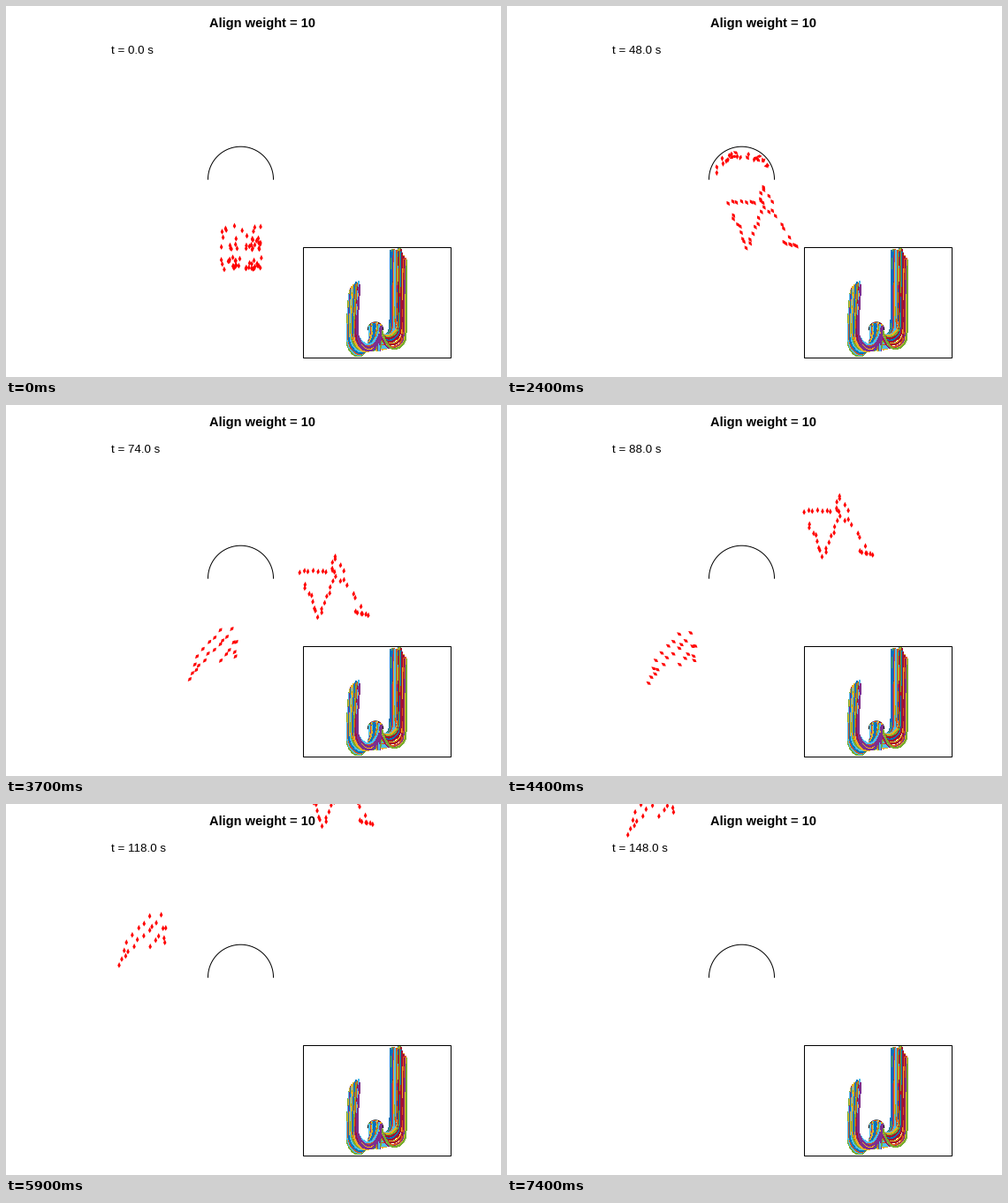
These frames come from a looping animation (560x420 px, 7.5 s). A matplotlib script:

```python
import numpy as np
import matplotlib.pyplot as plt
from matplotlib.animation import FuncAnimation
from matplotlib.collections import LineCollection, PolyCollection
from matplotlib.patches import Rectangle

W, H, DPI = 560, 420, 100
FRAMES, STEP = 75, 2.0            # simulated seconds per frame
CX, CY, R = 265.5, 196.2, 37.0    # shelter arc
SPEED = 4.8
PX = 72 / DPI                     # one pixel in points
rng = np.random.default_rng(4)

# Flock shapes as strokes: (agents, corner points)
RIGHT = [(8, [(334, 42), (371, 40)]),
         (8, [(340, 54), (349, 70), (356, 92)]),
         (7, [(359, 87), (374, 53)]),
         (7, [(377, 22), (370, 36), (380, 52)]),
         (7, [(382, 32), (386, 48), (404, 80)]),
         (6, [(400, 86), (414, 90)])]
LEFT = [(8, [(129, 251), (138, 221), (161, 194)]),
        (9, [(134, 238), (176, 195)]),
        (7, [(162, 230), (180, 206), (180, 226)])]

# Group courses: time, offset x, offset y, heading in degrees
RIGHT_KEYS = [(48, -86, 181, -56), (74, -4, 147, 83), (104, 0, 0, 89), (152, 3, -235, 89)]
LEFT_KEYS = [(74, 80, 60, 230), (104, 0, 0, 92), (152, 10, -235, 87)]


def hermite(t, t0, p0, v0, t1, p1, v1):
    d = t1 - t0
    u = (t - t0) / d
    return ((2 * u**3 - 3 * u**2 + 1) * p0 + (u**3 - 2 * u**2 + u) * d * v0
            + (3 * u**2 - 2 * u**3) * p1 + (u**3 - u**2) * d * v1)


def velocity(deg):
    a = np.radians(deg)
    return SPEED * np.array([np.cos(a), -np.sin(a)])


def course(t, keys):
    i = max(0, min(sum(k[0] <= t for k in keys) - 1, len(keys) - 2))
    (t0, x0, y0, h0), (t1, x1, y1, h1) = keys[i:i + 2]
    return hermite(t, t0, np.array([x0, y0]), velocity(h0),
                   t1, np.array([x1, y1]), velocity(h1))


def formation(strokes):
    parts = []
    for count, corners in strokes:
        c = np.array(corners, float)
        along = np.concatenate([[0], np.cumsum(np.hypot(*np.diff(c, axis=0).T))])
        s = np.linspace(0, along[-1], count)
        parts.append(np.column_stack([np.interp(s, along, c[:, k]) for k in (0, 1)]))
    pts = np.vstack(parts)
    pts += rng.uniform(-2, 2, pts.shape)
    return pts[np.argsort(pts[:, 0])]


def start_block(n):
    row = rng.choice([255, 268, 291], n, p=[0.17, 0.36, 0.47])
    return np.column_stack([rng.uniform(241, 289, n), row + rng.uniform(-7, 7, n)])


class Group:
    def __init__(self, strokes, keys):
        self.shape, self.keys = formation(strokes), keys
        n = len(self.shape)
        start = start_block(n)
        self.start = start[np.argsort(start[:, 0])]
        self.phase = rng.uniform(0, 2 * np.pi, n)
        self.rate = rng.uniform(0.35, 0.7, n)
        dx = (self.start[:, 0] - CX) * 1.28
        self.cap = CY - np.sqrt(R**2 - dx**2) + rng.uniform(4, 12, n)
        self.join, x, y, heading = keys[0]
        self.goal, self.v1 = self.shape + (x, y), velocity(heading)
        dist = np.hypot(*(self.goal - self.rise(60)).T)
        self.leave = np.clip(self.join - dist / SPEED, 23, self.join - 5)
        self.home = self.rise(self.leave)

    def rise(self, t):
        grow = 1 + 0.28 * np.clip(t / 22, 0, 1)
        x = CX + (self.start[:, 0] - CX) * grow
        return np.column_stack([x, np.maximum(self.start[:, 1] - SPEED * t, self.cap)])

    def dwell(self, t):
        amp = 1.5 * np.clip((t - 10) / 12, 0, 1) * np.clip((self.leave - t) / 4, 0, 1)
        a = self.phase + self.rate * t
        return self.rise(t) + np.column_stack([amp * np.cos(a), amp * np.sin(a)])

    def at(self, t):
        if t >= self.join:
            return self.shape + course(t, self.keys)
        out = hermite(t, self.leave[:, None], self.home, velocity(-90),
                      self.join, self.goal, self.v1)
        return np.where((t < self.leave)[:, None], self.dwell(t), out)


groups = [Group(RIGHT, RIGHT_KEYS), Group(LEFT, LEFT_KEYS)]


def positions(t):
    return np.vstack([g.at(t) for g in groups]) + 0.5


def kites(t):
    p = positions(t)
    d = positions(t + 0.2) - positions(t - 0.2)
    d /= np.maximum(np.hypot(*d.T), 1e-9)[:, None]
    side = 1.8 * np.column_stack([-d[:, 1], d[:, 0]])
    return np.stack([p + 3.3 * d, p + side - 0.4 * d,
                     p - 3.3 * d, p - side - 0.4 * d], axis=1)


fig = plt.figure(figsize=(W / DPI, H / DPI), dpi=DPI, facecolor="white")
ax = fig.add_axes([0, 0, 1, 1])
ax.set(xlim=(0, W), ylim=(H, 0))
ax.axis("off")


def shelter(x, y, r, z):
    a = np.linspace(0, np.pi, 90)
    ax.plot(x + r * np.cos(a), y - r * np.sin(a), color="black", lw=PX, zorder=z)


shelter(CX, CY, R, 2)
ax.text(289.5, 24, "Align weight = 10", ha="center", va="baseline",
        family="Liberation Sans", weight="bold", size=14.67 * PX)
clock = ax.text(118.6, 54, "", ha="left", va="baseline",
                family="Liberation Sans", size=13.33 * PX)
agents = PolyCollection(kites(0), facecolor="red", edgecolor="none", zorder=3)
ax.add_collection(agents)

# Inset: every track of the whole run at a smaller scale
IX, IY, SCALE = 418, 366.6, 0.235
FRAME = dict(xy=(336, 273), width=167, height=125)
box = ax.add_patch(Rectangle(**FRAME, fc="white", ec="none", zorder=5))
shelter(IX, IY, SCALE * R, 6)
tracks = np.stack([positions(t) for t in range(152)], axis=1)
tracks = (tracks - [CX, CY]) * SCALE + [IX, IY]
COLORS = ["#0072bd", "#d95319", "#edb120", "#7e2f8e", "#77ac30", "#4dbeee", "#a2142f"]
lines = LineCollection(tracks, zorder=7, linewidths=0.9 * PX, antialiaseds=False,
                       colors=[COLORS[i % 7] for i in rng.permutation(len(tracks))])
ax.add_collection(lines)
lines.set_clip_path(box)
ax.add_patch(Rectangle(**FRAME, fc="none", ec="black", lw=PX, zorder=8))


def update(i):
    t = i * STEP
    agents.set_verts(kites(t))
    clock.set_text(f"t = {t:.1f} s")
    return agents, clock


anim = FuncAnimation(fig, update, frames=FRAMES, interval=100,
                     repeat=True, repeat_delay=0, blit=False)
plt.show()
```
